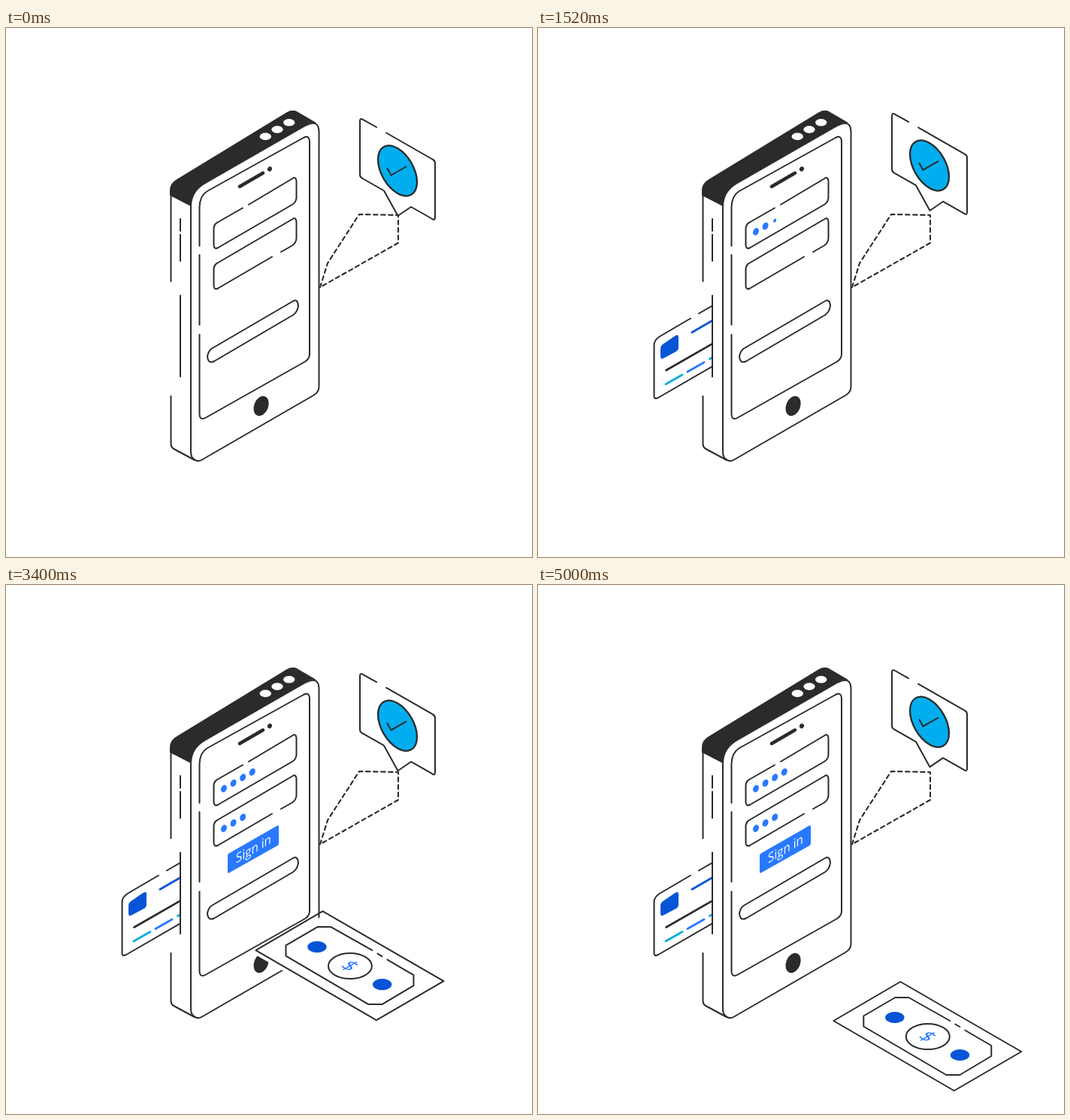
Recreate the animation shown at these times as an HTML page with a canvas. Size 700x704 px, loop 5040 ms.

```html
<!DOCTYPE html>
<html lang="en">
<head>
<meta charset="utf-8">
<style>
  html, body { margin: 0; width: 100%; height: 100%; overflow: hidden; background: #fff; }
  canvas { display: block; width: 700px; height: 704px; }
</style>
</head>
<body>
<canvas id="stage" width="700" height="704"></canvas>
<script>
const ctx = document.getElementById('stage').getContext('2d');
const LOOP = 5040, STEP = 40;
const INK = '#2b2b2b', BLUE = '#2979ff', DEEP = '#0755d6', CYAN = '#00aeef';
const FONT = '"Open Sans", sans-serif';

const clamp01 = v => Math.min(1, Math.max(0, v));
const span = (t, a, b) => clamp01((t - a) / (b - a));
const ease = p => 0.5 - 0.5 * Math.cos(Math.PI * p);
const mix = (a, b, p) => a + (b - a) * p;

function stroke(d, color = INK, width = 2) {
  ctx.strokeStyle = color;
  ctx.lineWidth = width;
  ctx.stroke(new Path2D(d));
}
function fill(d, color) {
  ctx.fillStyle = color;
  ctx.fill(new Path2D(d));
}
function ellipse(x, y, rx, ry, color, turn = 0) {
  ctx.fillStyle = color;
  ctx.beginPath();
  ctx.ellipse(x, y, rx, ry, turn, 0, 7);
  ctx.fill();
}
function group(draw, x = 0, y = 0, alpha = 1) {
  ctx.save();
  ctx.translate(x, y);
  ctx.globalAlpha *= alpha;
  draw();
  ctx.restore();
}

function phone() {
  fill('M219 223V216Q219 207 228 202L374 113Q381 109 387 112L411 126Q405 125 396 131L264 207Q247 217 246 236Z', INK);
  stroke('M219 222V216Q219 207 228 202L374 113Q381 109 387 112L411 126');
  for (let i = 0; i < 3; i++) ellipse(345.3 + i * 15.7, 144.4 - i * 9.3, 7.7, 4.8, '#fff');

  // body
  stroke('M246 236Q247 217 264 207L399 129.5Q416 121 416.5 138V478Q416 485 409 489L261 574.5Q255 578 251 574.5Q246 572 246 564Z');
  stroke('M219.5 222V337M219.5 490V552Q219 558 224 560.5L251 575M219 222L246 236');
  stroke('M232 254V270M232 275V310M232 356V464');

  // screen
  stroke('M257.5 290V238Q258 223 268 217L396 146Q404 142 404 152V434Q404 440 398 444L266 518.5Q258 523 257.5 514V408M257.5 302V395');
  stroke('M311 211L342 193', INK, 4.5);
  ellipse(351, 187.7, 2.9, 3.3, INK, 0.5);
  ellipse(339.6, 503, 9.4, 13.8, INK, 0.38);

  // fields and slot
  stroke('M323 235L381 200.5Q386 197 386.5 204V226Q386 232 381 235L282 292.5Q277 295 276.5 289V267Q277 261 281 259L315 239.5');
  stroke('M354 304.5L282 346.5Q277 349 276.5 343V321Q277 315 281 313L381 254.5Q386 251 386.5 258V280Q386 286 381 289.5L366 298');
  stroke('M274 426.5L382 363.5Q388 360 389 369.5Q388 378 382 382L277 443.5Q269 447.5 268 437Q269 430 274 426.5Z');
}

function card(t) {
  const p = ease(span(t, 80, 920));
  const alpha = span(t, 40, 280);
  if (!alpha) return;
  ctx.save();
  ctx.beginPath();
  ctx.rect(0, 0, 232, 704);
  ctx.clip();
  group(() => {
    stroke('M214 380L290 336M203 386.5L162 410.5Q154.5 415 154.5 422V489Q154 495 160 492L290 417');
    fill('M166 421L182 410Q187 407 187 411V425Q187 429 183 431L168 439Q163 442 163 437V427Q163 423 166 421Z', DEEP);
    stroke('M205 405L250 379', DEEP, 2.8);
    stroke('M170.5 455.5L290 387', INK, 2.6);
    stroke('M170 474L192 461.5M228.5 440.5L250 428', '#08aede', 2.8);
    stroke('M199 457.5L221 445', BLUE, 2.8);
  }, -81 * (1 - p), 47 * (1 - p), alpha);
  ctx.restore();
}

function dots(t) {
  for (let i = 0; i < 7; i++) {
    const col = i % 4, row = i >> 2;
    const size = span(t, 1120 + i * 170, 1240 + i * 170);
    if (size) ellipse(290 + col * 12.6, 271 - col * 7.4 + row * 53, 3.7 * size, 5.1 * size, BLUE, 0.45);
  }
}

function signIn(t) {
  group(() => {
    fill('M297 357L361 320.3Q363 319.5 363 321.5V344Q363 346 361 347L297 383Q295 384 295 382V360Q295 358 297 357Z', BLUE);
    ctx.transform(0.866, -0.5, 0, 1, 329.5, 351.5);
    ctx.font = '17.5px ' + FONT;
    ctx.textAlign = 'center';
    ctx.fillStyle = '#fff';
    ctx.fillText('Sign in', 0, 5.5);
  }, 0, 0, span(t, 2400, 2600));
}

function bill(t) {
  if (t < 2720) return;
  const out = ease(span(t, 2650, 3460)), drop = ease(span(t, 3460, 3710));
  const x = 300.3 + mix(-53, 160, out) + 58 * drop;
  const y = 374.5 + mix(-45, 134.5, out) + 91.5 * drop;
  ctx.save();
  // the note is visible only below the mouth of the slot
  ctx.clip(new Path2D('M0 585L274 426.5L382 363.5L700 178V704H0Z'));
  group(() => {
    group(() => fill('M-125 -20.5L-36 -72.5L235 84L145.5 136Z', '#fff'), 0, 12 - 6 * out);
    stroke('M-125 -20.5L-36 -72.5L125 20.5L35.5 72.5Z');
    stroke('M30 -20.5L-25 -51.5H-43L-85 -27V-13L25 51.5H43L85 26.5V12.5L50 -8M37 -16L43 -12.5');
    ctx.beginPath();
    ctx.ellipse(0.5, 0.5, 29, 17, 0, 0, 7);
    ctx.stroke();
    ellipse(-43.5, -25, 12.7, 7.6, DEEP);
    ellipse(43.2, 25, 12.7, 7.6, DEEP);
    ctx.transform(0.866, 0.5, -0.866, 0.5, 0.3, 0.3);
    ctx.font = '26px ' + FONT;
    ctx.textAlign = 'center';
    ctx.fillStyle = BLUE;
    ctx.fillText('$', 0, 9.3);
  }, x, y);
  ctx.restore();
}

function bubble(t) {
  const turn = t < 793 ? t / 793 : (t - 793) / 1185;
  group(() => {
    stroke('M493 132L475 121.8Q471 119.5 471 124V195Q471 198.5 474 200L503 216.5L521.5 250L539 238L568 254.5Q571 256 571 252V180Q571 176.5 568 175L506 139.5');
    ctx.save();
    ctx.transform(0.866, 0.5, 0, 1, 521, 190);
    ctx.beginPath();
    ctx.arc(0, 0, 30, 0, 7);
    ctx.restore();
    ctx.fillStyle = CYAN;
    ctx.fill();
    ctx.lineWidth = 2.3;
    ctx.stroke();
    stroke('M507.5 187L512.5 196L532.5 184.5');
  }, 0, 4 * Math.cos(2 * Math.PI * turn) - 4);
}

function trail() {
  ctx.setLineDash([5.5, 4.5]);
  stroke('M418 345L428 313L470 248L522 249V286L418 345', INK, 2.1);
  ctx.setLineDash([]);
}

function draw(t) {
  ctx.fillStyle = '#fff';
  ctx.fillRect(0, 0, 700, 704);
  ctx.lineCap = ctx.lineJoin = 'round';
  card(t);
  phone();
  dots(t);
  signIn(t);
  bill(t);
  trail();
  bubble(t);
}

const start = performance.now();
function tick() {
  const t = (performance.now() - start) % LOOP;
  draw(Math.floor(t / STEP) * STEP);
  requestAnimationFrame(tick);
}
tick();
</script>
</body>
</html>
```
